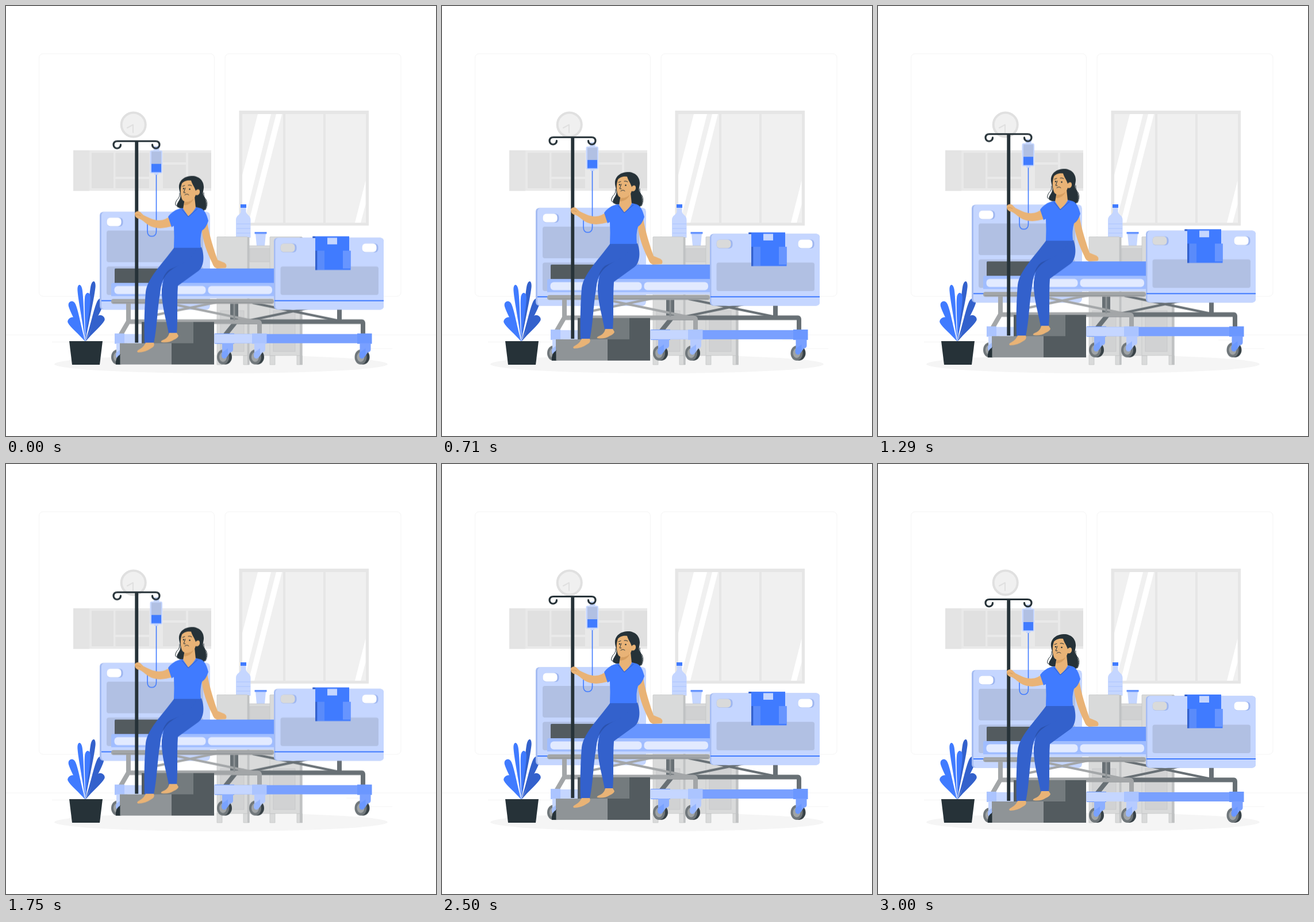
Recreate the animation shown at these times as an HTML page without scripts. Size 748 px wide and 748 px high, loop 3040 ms.

```html
<!DOCTYPE html>
<html lang="en">
<head>
<meta charset="utf-8">
<title>Hospital room</title>
<style>
html, body { margin: 0; width: 100%; height: 100%; overflow: hidden; background: #fff; }
svg { display: block; width: 100%; height: 100%; }
.line { fill: none; stroke-linecap: round; stroke-linejoin: round; }
.pale { fill: #c5d6ff; }
.panel { fill: #b1c0e3; }
.blue { fill: #407bff; }
.navy { fill: #3361cc; }
.ink { fill: #263238; }
.skin { fill: #e9b376; }
.wall { fill: none; stroke: #f4f4f4; }
.lift { animation: lift 3040ms linear infinite; }
@keyframes lift {
  0% { transform: translateY(-.4px); }
  49.6% { transform: translateY(-14.8px); }
  98.7% { transform: translateY(0); }
  100% { transform: translateY(-.4px); }
}
</style>
</head>
<body>
<svg viewBox="0 0 748 748">
<defs>
  <g id="wheel">
    <ellipse cx="1" rx="12" ry="13" fill="#384247"/>
    <ellipse cx="-2.500" rx="10.500" ry="13" fill="#70777b"/>
    <ellipse cx="-2.500" rx="6.500" ry="8.500" fill="#a0a4a6"/>
  </g>
  <g id="fork">
    <path d="M-4-24H15V-13Q15-9 10-8L4 0Q0 5-4 1Q-6-3-4-8Z"/>
    <path d="M-4-8L6-15V-3L4 0Q0 5-4 1Q-6-3-4-8Z" fill="#407bff" opacity=".25"/>
  </g>
  <g id="grip">
    <rect width="28" height="15.500" rx="6" fill="#9eb6f0"/>
    <rect width="25" height="15" rx="6"/>
  </g>
  <path id="leaf" d="M0 0C-2-20-8-40-7-50C-6-57 6-57 7-50C8-40 2-20 0 0Z"/>
</defs>

<!-- room -->
<g class="wall">
  <rect x="57.500" y="83" width="305" height="422" rx="7"/>
  <rect x="381" y="83" width="306" height="422" rx="7"/>
  <path d="M0 572H748M80 584.500H190M592 581H622M632 596H672"/>
</g>
<ellipse cx="374" cy="623" rx="290" ry="16" fill="#f5f5f5"/>

<g fill="#e0e0e0">
  <path d="M117 251H357V321.500H117Z" fill="#e9e9e9"/>
  <path d="M117 251H145V321.500H117Z" fill="#e4e4e4"/>
  <path d="M149 255.500H187V317H149ZM190.500 255.500H249V297H190.500ZM190.500 301H249V317H190.500ZM273 255.500H313V272H273ZM273 276H313V317H273ZM317 255.500H357V317H317Z"/>
</g>
<circle cx="221.700" cy="206.500" r="21" fill="#f0f0f0" stroke="#e0e0e0" stroke-width="4"/>
<path d="M211 212L221 206.500V220" class="line" stroke="#e0e0e0" stroke-width="2"/>

<path d="M405.500 182H631V382H405.500Z" fill="#e6e6e6"/>
<path d="M411 188H626V377H411Z" fill="#f0f0f0"/>
<path d="M482 188H486V377H482ZM552 188H556V377H552Z" fill="#e6e6e6"/>
<path d="M438 188H461L414 377H411V294ZM470 188H480L432 377H422ZM625.500 304V345L617 377H607Z" fill="#fff"/>

<!-- bottle, cup, cabinet -->
<g>
  <path class="pale" d="M408.500 351H417.500V358C418 363 425.500 364 425.500 372V403H400V372C400 364 408 363 408.500 358Z"/>
  <path class="blue" d="M408 345H418V351H408Z"/>
  <path d="M401 379H425M401 387H425M401 395H425" stroke="#abc4ff"/>
  <path class="pale" d="M434 396H452L450 417H436Z"/>
  <path d="M432.500 393H453.500V396.500H432.500Z" fill="#6795ff"/>
</g>
<g fill="#d9dada" stroke="#c2c4c5" stroke-width=".7">
  <path d="M367 608H376V624H367ZM413 608H423V624H413ZM459 608H468V624H459ZM506 608H515.500V624H506Z"/>
  <rect x="420" y="417" width="48" height="191"/>
  <rect x="424" y="422" width="38" height="23" fill="#d0d1d2"/>
  <rect x="367" y="401.500" width="53" height="206.500" rx="1"/>
  <rect x="459" y="401.500" width="56" height="206.500" rx="1"/>
  <g fill="#d1d2d3">
    <rect x="373" y="530" width="41" height="71"/>
    <rect x="465" y="530" width="38" height="71"/>
  </g>
</g>
<path d="M420 402H423.500V624H420ZM511 402H515.500V624H511Z" fill="#c0c2c3"/>

<!-- plant -->
<g transform="translate(138 584)">
  <g class="navy">
    <use href="#leaf" transform="rotate(8) scale(.6 1.920)"/>
    <use href="#leaf" transform="rotate(21) scale(.85 1.460)"/>
    <use href="#leaf" transform="rotate(34) scale(1 .98)"/>
  </g>
  <g class="blue">
    <use href="#leaf" transform="rotate(-6) scale(.6 1.800)"/>
    <use href="#leaf" transform="rotate(3) scale(.7 1.540)"/>
    <use href="#leaf" transform="rotate(-20) scale(.9 1.350)"/>
    <use href="#leaf" transform="rotate(-33) scale(1.050 .89)"/>
  </g>
</g>
<path class="ink" d="M110 583H168L163 624H115Z"/>

<g class="lift">
  <!-- headboard -->
  <rect x="163" y="358.500" width="191.500" height="170" rx="6" fill="#a5bcf2"/>
  <rect class="pale" x="166" y="358.500" width="188.500" height="170" rx="6"/>
  <rect class="panel" x="175" y="391" width="168" height="55" rx="4"/>
  <rect class="panel" x="175" y="453.500" width="168" height="49.500" rx="4"/>
  <use href="#grip" x="175.500" y="368.500" fill="#fff"/>
  <path class="blue" d="M166 512H354V514H166Z"/>

  <!-- far undercarriage -->
  <g class="line" stroke="#687075">
    <path d="M381 573L400 549.500H619Q621 549.500 621 552V572M580 526V549" stroke-width="8" stroke-linecap="butt"/>
    <path d="M430 517L580 548M420 548L530 525" stroke-width="4"/>
    <path d="M397 517V547" stroke-width="14" stroke-linecap="butt"/>
  </g>
  <path d="M365 571H636V587H365Z" fill="#79a0ff"/>
  <path d="M363 570H397V588H363ZM611 570H636.500V588H611Z" fill="#6b97ff"/>
  <use href="#wheel" x="380" y="611"/>
  <use href="#wheel" x="619.500" y="611"/>
  <use href="#fork" x="380" y="611" fill="#8dafff"/>
  <use href="#fork" x="619.500" y="611" fill="#79a0ff"/>

  <!-- near undercarriage -->
  <g class="line" stroke="#a3a6a8">
    <path d="M245 541L365 516M285 518L430 548" stroke-width="4"/>
    <path d="M213 516V549L199 573M211 549.500H437Q441 549.500 441 553V572" stroke-width="8" stroke-linecap="butt"/>
    <path d="M397 518V546" stroke-width="3" stroke="#8c9194"/>
  </g>
  <path class="pale" d="M189 571H452V587H189Z"/>
  <path d="M189 570H206V588H189ZM428 570H453.500V588H428Z" fill="#abc4ff"/>
  <use href="#wheel" x="196" y="611"/>
  <use href="#wheel" x="436" y="611"/>
  <use href="#fork" x="196" y="611" fill="#c5d6ff"/>
  <use href="#fork" x="436" y="611" fill="#b6cbff"/>

  <!-- mattress -->
  <path d="M189 457H470V483H189Z" fill="#6795ff"/>
  <path d="M191 457H270V482H189V459Q189 457 191 457Z" fill="#535b5f"/>
  <rect x="183" y="482" width="285" height="27" rx="3" fill="#a0bdff"/>
  <path d="M183 505H466V509H183Z" class="pale"/>
  <rect x="188.500" y="487.500" width="159" height="14" rx="6" fill="#e2eaff"/>
  <rect x="351.500" y="487.500" width="111.500" height="14" rx="6" fill="#e2eaff"/>
  <rect x="183" y="510" width="283" height="8.500" rx="4" fill="#a3a6a8"/>
  <path d="M186 516.500H463" stroke="#8b9093"/>

  <!-- footboard -->
  <rect x="466" y="403.500" width="191" height="125" rx="6" fill="#a5bcf2"/>
  <rect class="pale" x="468.500" y="403.500" width="188.500" height="125" rx="6"/>
  <rect class="panel" x="477.500" y="453.500" width="170.500" height="49.500" rx="4"/>
  <use href="#grip" x="477.500" y="413.500" fill="#d9dada"/>
  <use href="#grip" x="619.500" y="413.500" fill="#fff"/>
  <path class="blue" d="M467 512H657V514H467Z"/>
  <path class="blue" d="M533.500 401H597V426H599.500V459.500H538V404H533.500Z"/>
  <path class="navy" d="M538 426H541.500V459.500H538ZM533.500 401H538V404H533.500Z"/>
  <path class="pale" d="M559 403.500H576V415H559Z"/>
  <path d="M541.500 426H554V459H541.500Z" fill="#5a8bfa"/>
  <path d="M586 426H599.500V457H586Z" fill="#6795ff"/>

  <!-- step stool -->
  <path d="M236 550H362V624H236Z" fill="#535b5f"/>
  <path d="M242 550H326V587H242Z" fill="#747b7e"/>
  <path d="M198 587H288V624H198Z" fill="#8f9497"/>
  <path d="M200 606Q190 610 191 624H198.500V606Z" class="ink"/>

  <!-- drip -->
  <path class="line" stroke="#407bff" stroke-width="1.600" d="M261.500 292V392Q261.500 401 253.500 401Q246 401 246 392V374Q246 366 238 366"/>
  <path class="pale" d="M259 244H265Q268 247 266 253H257Q256 247 259 244ZM258 289H265V294H258Z"/>
  <rect class="pale" x="250.500" y="251.500" width="21.500" height="40" rx="3"/>
  <path class="panel" d="M253 253.500H270V276H253Z"/>
  <path class="blue" d="M253 275H270V289.500H253Z"/>

  <!-- woman -->
  <path class="ink" d="M322 296C334 295 344 303 344 315C344 322 341 325 344 331C350 340 350 350 346 355Q342 359 336 357L312 352Q304 354 298 350C295 345 301 341 303 334C305 327 300 321 301 312C303 302 311 297 322 296Z"/>
  <path class="line" stroke="#263238" d="M302 326Q303 333 297 338Q292 347 297 348M344 325Q343 332 348 337Q352 345 347 355"/>
  <path class="skin" d="M340 382L350 377C354 400 361 422 368 442L380 447Q386 451 382 456L367 457Q361 455 359 448C350 430 341 408 340 382Z"/>
  <path class="navy" d="M293 420H340C346 436 344 454 335 461L299 487C297 515 299 548 297 570H283C278 542 270 520 271 493L275 471Z"/>
  <path class="skin" d="M284 569H297L300 574Q299 578 292 581Q283 587 270 585Q268 583 276 580Q283 576 284 569Z"/>
  <path d="M293 421L306 448C290 458 272 464 268 496Q261 488 264 470Z" fill="#2b52ad"/>
  <path class="navy" d="M293 420H332C325 444 304 450 284 459C271 469 270 487 268 500C263 528 263 559 257 587H241C240 555 241 522 243 498C246 474 270 451 293 420Z"/>
  <path class="skin" d="M243 586H257Q260 592 252 596Q242 603 230 603Q225 601 233 597Q240 593 243 586Z"/>
  <path class="ink" d="M224.300 236H230.200V586H224.300Z"/>
  <path class="line" stroke="#263238" stroke-width="3.200" d="M199.500 241.500A6.200 6.200 0 1 1 187 242Q187 235.500 194 235.500H260Q267 235.500 267 242A6.200 6.200 0 1 1 254.500 241.500"/>
  <path class="skin" d="M224 360Q229 355 234 359L239 364C253 371 267 379 284 367L290 383C274 388 260 389 247 381C240 376 235 370 229 370Q223 367 224 360Z"/>
  <path class="line" stroke="#c98f52" stroke-width=".7" d="M225 364Q230 362 234 365"/>
  <path class="blue" d="M307 352C295 353 286 361 282 367L288 385L292 383Q293 402 292 421H339Q337 403 341 391Q348 387 352 374C349 362 345 354 338 352L330 350Z"/>
  <path class="skin" d="M311 336L308 353L317 366Q325 360 330 351L328 332Z"/>
  <path d="M311 341Q320 342 327 335Q322 346 310 347Z" fill="#c98f52" opacity=".6"/>
  <path class="skin" d="M306 309C303 317 303 328 306 336C309 343 320 342 326 336Q329 333 330 329C334 331 338 327 337 322C336 318 332 319 330 322C328 315 324 311 322 304C317 303 310 304 306 309Z"/>
  <path class="line" stroke="#263238" stroke-width="1" d="M307 314L311 312.500M317 312Q320 311 323 313M311 329Q315 326 318 329M312 317L309 325H312"/>
  <circle class="ink" cx="309" cy="318" r="1.300"/>
  <circle class="ink" cx="319.500" cy="319" r="1.300"/>
  <path class="line" stroke="#2b52ad" stroke-width=".8" d="M306 354L317 367L333 353"/>
</g>
</svg>
</body>
</html>
```
